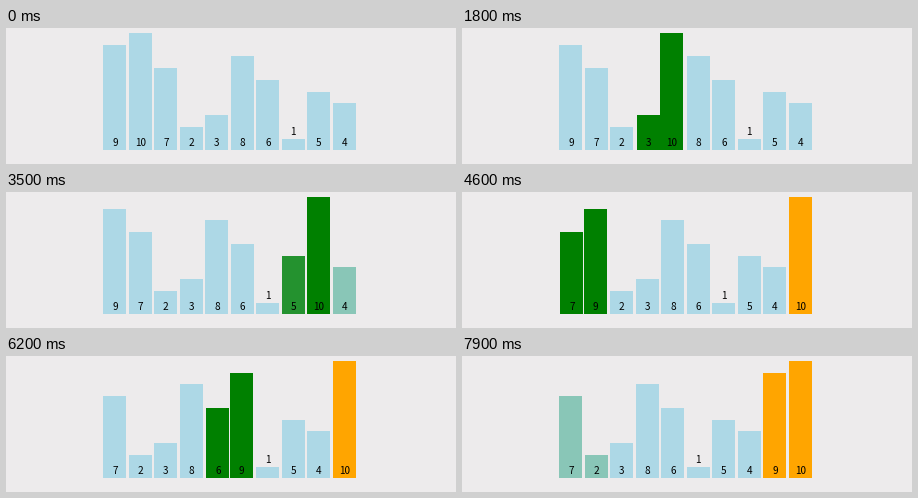
These frames come from a looping animation (450x136 px, 8000 ms). A matplotlib script:

```python
import numpy as np
import matplotlib.pyplot as plt
from matplotlib.animation import FuncAnimation
from matplotlib.colors import to_rgb
from matplotlib.patches import Rectangle

W, H, DPI = 450, 136, 100
FRAMES, TICK = 80, 100
VALUES = [9, 10, 7, 2, 3, 8, 6, 1, 5, 4]
BLUE, GREEN, ORANGE = (np.array(to_rgb(c)) for c in ("lightblue", "green", "orange"))
LEFT, PITCH, BAR_W = 97.3, 25.5, 23.1
BASE, UNIT = 122.3, 11.73

# cubic-bezier(.25, .1, .25, 1)
s = np.linspace(0, 1, 201)
EASE_X = 0.75 * s * (1 - s) ** 2 + 0.75 * s**2 * (1 - s) + s**3
EASE_Y = 0.3 * s * (1 - s) ** 2 + 3 * s**2 * (1 - s) + s**3


def ease(x):
    return np.interp(x, EASE_X, EASE_Y)


def bubble_sort():
    """Return swaps as (tick, slot) and colour changes per value."""
    order, tick = VALUES[:], 5
    swaps, paints = [], {v: [(-9, BLUE)] for v in VALUES}

    def paint(v, colour):
        if paints[v][-1][1] is not colour:
            paints[v].append((tick, colour))

    for end in range(len(order) - 1, 0, -1):
        for j in range(end):
            if tick >= FRAMES:
                return swaps, paints
            for k in range(end + 1):
                paint(order[k], GREEN if k in (j, j + 1) else BLUE)
            if order[j] > order[j + 1]:
                order[j], order[j + 1] = order[j + 1], order[j]
                swaps.append((tick + 2, j))
                tick += 2
            tick += 2
        for k in range(end):
            paint(order[k], BLUE)
        paint(order[end], ORANGE)
        tick += 4
    return swaps, paints


SWAPS, PAINTS = bubble_sort()


def layout(t):
    order = VALUES[:]
    shift = {}
    for start, j in SWAPS:
        if start > t:
            break
        a, b = order[j], order[j + 1]
        order[j], order[j + 1] = b, a
        rest = 1 - ease(0.25 + 0.5 * (t - start))
        shift[a], shift[b] = -rest, rest
    return {v: i + shift.get(v, 0) for i, v in enumerate(order)}


def colour(v, t):
    c = BLUE
    for start, new in PAINTS[v]:
        if start <= t:
            c = c + (new - c) * ease(0.16 + 0.5 * (t - start))
    return np.clip(c, 0, 1)


fig = plt.figure(figsize=(W / DPI, H / DPI), dpi=DPI, facecolor="#edebec")
ax = fig.add_axes([0, 0, 1, 1])
ax.set(xlim=(0, W), ylim=(H, 0))
ax.axis("off")

bars, labels = {}, {}
for v in VALUES:
    bars[v] = ax.add_patch(Rectangle((0, BASE - UNIT * v), BAR_W, UNIT * v, lw=0))
    labels[v] = ax.text(0, 118.3 if v > 1 else 106.7, str(v), ha="center",
                        va="baseline", family="Noto Sans CJK JP",
                        size=10 * 72 / DPI, color="black")


def draw(t):
    for v, slot in layout(t).items():
        x = LEFT + PITCH * slot
        bars[v].set_x(x)
        bars[v].set_facecolor(colour(v, t))
        labels[v].set_x(x + BAR_W / 2)
        # smaller bars pass in front of the one they swap with
        bars[v].set_zorder(30 - 2 * v)
        labels[v].set_zorder(31 - 2 * v)
    return [*bars.values(), *labels.values()]


anim = FuncAnimation(fig, draw, frames=FRAMES, interval=TICK, repeat=True,
                     repeat_delay=0)
plt.show()
```
